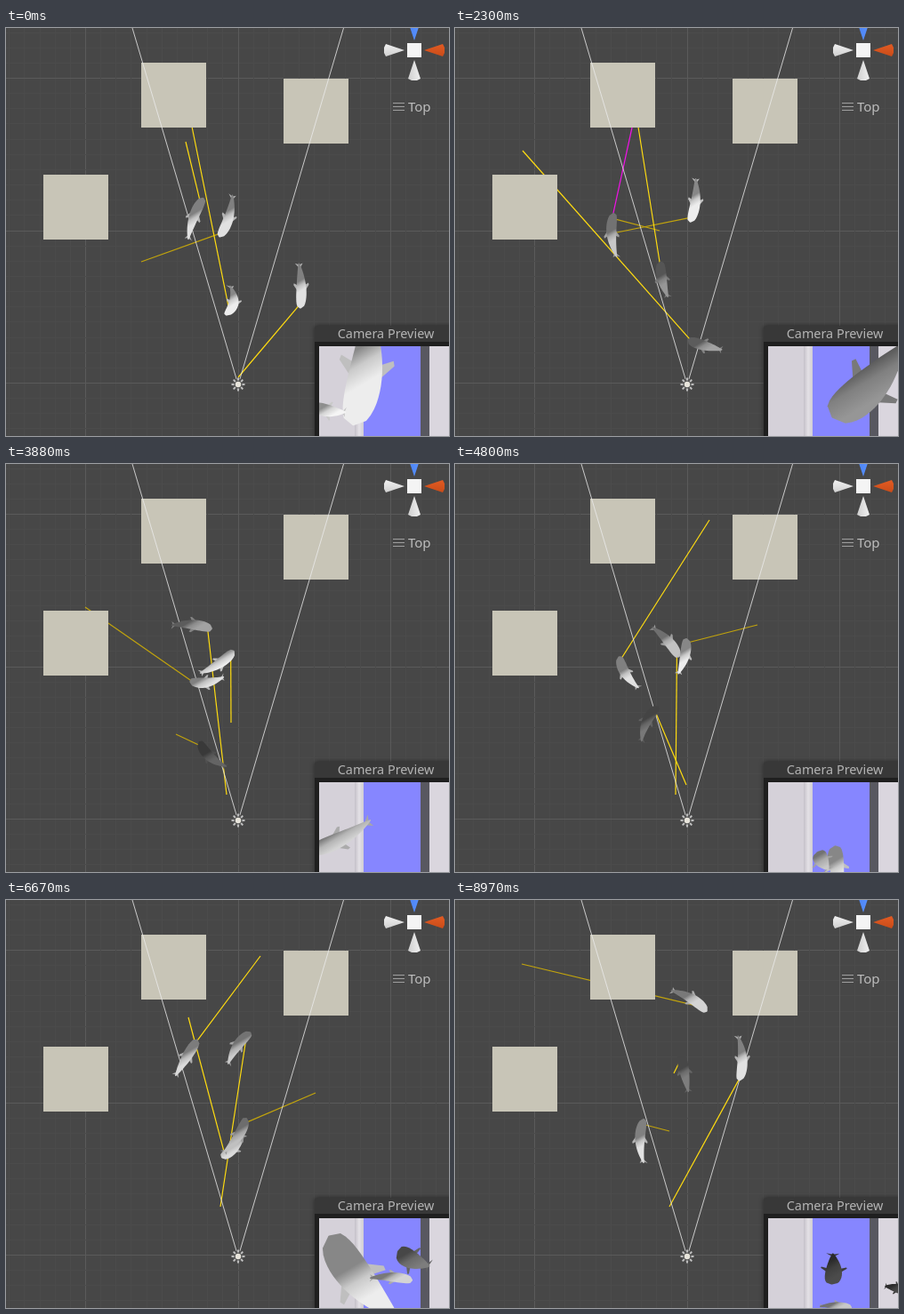
Animation, 498 px wide and 459 px high, one loop 9070 ms. Source, as an HTML page with a canvas:

```html
<!DOCTYPE html>
<html lang="en">
<head>
<meta charset="utf-8">
<title>Swimming whales</title>
<style>
html, body { margin: 0; width: 100%; height: 100%; overflow: hidden; background: #474747; }
canvas { display: block; }
</style>
</head>
<body>
<canvas id="stage" width="498" height="459"></canvas>
<script>
const ctx = document.getElementById('stage').getContext('2d');
const LOOP = 9070, STEPS = 98;
const KEYS = [0, 10, 25, 42, 61, 81, 97];
const CUBES = [[152, 39], [312, 57], [42, 165]];

// pose: x, y, heading in degrees, brightness, length
const whales = [
  {
    pose: [[212, 214, -70, .9, 50], [226, 179, -29, .8, 47], [269, 194, 97, .95, 50], [226, 244, 172, .9, 39],
           [183, 215, 297, .9, 45], [221, 148, 305, .85, 50], [264, 112, 390, .85, 47]],
    goal: [[202, 128], [260, 240], [172, 232], [89, 161], [286, 63], [286, 63], [75, 72]],
    wall: [10, 378, 129]
  }, {
    pose: [[249, 212, 107, .9, 50], [230, 248, 158, .6, 49], [178, 233, 266, .8, 50], [209, 182, 365, .65, 46],
           [250, 228, 446, .9, 45], [242, 302, 532, .85, 31], [210, 271, 630, .9, 50]],
    goal: [[152, 263], [147, 178], [230, 228], [248, 372], [248, 372], [205, 132], [241, 260]],
    wall: [25, 199, 112]
  }, {
    pose: [[253, 307, 97, .95, 34], [244, 319, 235, .35, 20], [234, 283, 258, .6, 41], [238, 224, 327, .95, 46],
           [264, 207, 244, .95, 37], [279, 145, 355, .7, 50], [321, 178, 448, .9, 51]],
    goal: [[195, 42], [195, 42], [195, 42], [253, 291], [340, 181], [241, 345], [241, 345]],
    wall: [61, 225, 75]
  }, {
    pose: [[331, 290, 88, .9, 51], [322, 330, 114, .95, 47], [281, 357, 196, .65, 40], [231, 328, 222, .4, 42],
           [229, 269, 361, .55, 46], [270, 253, 257, .95, 48], [258, 194, 259, .5, 45]],
    goal: [[261, 393], [76, 138], [76, 138], [191, 304], [260, 361], [348, 217], [246, 195]]
  }
];

// camera view: x, y, heading, brightness, length, width
const views = [
  [[402, 379, 97, .95, 138, 38], [364, 430, 190, 1, 36, 13]],
  [[389, 423, -22, 1, 54, 14], [396, 438, -58, .9, 50, 15]],
  [[467, 398, 134, .6, 118, 42]],
  [[376, 420, 153, .85, 78, 17]],
  [[428, 441, 260, .95, 50, 17], [410, 441, 240, .8, 24, 16]],
  [[379, 402, 230, .95, 126, 39], [448, 400, 205, .5, 40, 20], [446, 426, 3, .85, 48, 10]],
  [[425, 415, 92, .3, 35, 18], [428, 457, 2, .8, 36, 7], [495, 437, 15, .3, 24, 9]]
];

const rad = deg => deg * Math.PI / 180;
const mix = (a, b, u) => a + (b - a) * u;
const grey = v => { const n = Math.round(Math.max(0, Math.min(1, v)) * 245); return `rgb(${n},${n},${n})`; };

function rect(color, x, y, w, h) {
  ctx.fillStyle = color;
  ctx.fillRect(x, y, w, h);
}

function line(color, x1, y1, x2, y2, width = 1) {
  ctx.strokeStyle = color;
  ctx.lineWidth = width;
  ctx.beginPath();
  ctx.moveTo(x1, y1);
  ctx.lineTo(x2, y2);
  ctx.stroke();
}

function shape(color, points) {
  ctx.fillStyle = color;
  ctx.beginPath();
  points.forEach(([x, y]) => ctx.lineTo(x, y));
  ctx.closePath();
  ctx.fill();
}

function drawWhale(x, y, deg, tone, length, width, bend = 0) {
  const a = rad(deg), c = Math.cos(a), s = Math.sin(a);
  const spine = u => bend * length * ((u - .5) ** 2 * 4 - .5);
  const half = u => width * 1.116 * u ** .9 * (1 - u) ** .4;
  const at = (u, side) => [(u - .5) * length, spine(u) + side];
  ctx.save();
  ctx.translate(x, y);
  ctx.rotate(a);

  const lx = (-.5 * c - .85 * s) * width / 2, ly = (.5 * s - .85 * c) * width / 2;
  const skin = ctx.createLinearGradient(lx, ly, -lx, -ly);
  skin.addColorStop(0, grey(tone * .58));
  skin.addColorStop(.45, grey(tone * .87));
  skin.addColorStop(1, grey(tone * 1.02));

  for (const side of [-1, 1]) {
    shape(grey(tone * .82), [at(.62, side * width * .38), at(.48, side * width * .82),
      at(.44, side * width * .78), at(.5, side * width * .3)]);
  }
  shape(grey(tone * .8), [at(.12, 0), at(0, -width * .42), at(.035, 0), at(0, width * .42)]);

  const outline = [];
  for (let i = 0; i <= 20; i++) outline.push(at(i / 20, half(i / 20) + .5));
  for (let i = 20; i >= 0; i--) outline.push(at(i / 20, -half(i / 20) - .5));
  shape(skin, outline);
  ctx.restore();
}

// Hermite path that leaves and enters each key along the heading
function whaleAt(whale, f) {
  let i = 0;
  while (i < KEYS.length - 2 && f >= KEYS[i + 1]) i++;
  const span = KEYS[i + 1] - KEYS[i], u = (f - KEYS[i]) / span;
  const p = whale.pose[i], q = whale.pose[i + 1];
  const reach = Math.hypot(q[0] - p[0], q[1] - p[1]);
  const curve = (k, trig) => {
    const m = trig(rad(p[2])) * reach, n = trig(rad(q[2])) * reach;
    return p[k] * (2 * u ** 3 - 3 * u * u + 1) + m * (u ** 3 - 2 * u * u + u)
      + q[k] * (3 * u * u - 2 * u ** 3) + n * (u ** 3 - u * u);
  };
  const deg = mix(p[2], q[2], u), length = mix(p[4], q[4], u);
  const x = curve(0, Math.cos), y = curve(1, Math.sin);
  return {
    x, y, deg, length,
    tone: mix(p[3], q[3], u),
    bend: (q[2] - p[2]) / span * .014,
    goal: whale.goal[u < .5 ? i : i + 1],
    headX: x + Math.cos(rad(deg)) * length * .38,
    headY: y + Math.sin(rad(deg)) * length * .38
  };
}

function drawRay(w, [x, y], bright, dim) {
  const flat = Math.abs(x - w.headX) > Math.abs(y - w.headY);
  line(flat ? dim : bright, w.headX, w.headY, x, y, 1.2);
}

function drawGrid() {
  rect('#474747', 0, 0, 498, 459);
  for (let i = -6; i < 26; i++) {
    const color = i % 10 ? '#4b4b4b' : '#5a5a5a';
    const x = Math.round(89 + i * 17.15) + .5, y = Math.round(57 + i * 17.15) - .5;
    line(color, x, 0, x, 459);
    line(color, 0, y, 498, y);
  }
}

function drawCamera() {
  line('rgba(235,235,235,.8)', 142, 0, 260, 398);
  line('rgba(235,235,235,.8)', 379.5, 0, 262, 398);
  ctx.fillStyle = '#555';
  ctx.beginPath();
  ctx.arc(261, 401, 6.5, 0, 7);
  ctx.fill();
  for (let i = 0; i < 8; i++) {
    const c = Math.cos(i * Math.PI / 4), s = Math.sin(i * Math.PI / 4);
    line('#c8c8c8', 261 + c * 4.5, 401 + s * 4.5, 261 + c * 7.5, 401 + s * 7.5, 1.8);
  }
  ctx.fillStyle = '#e8e5dc';
  ctx.beginPath();
  ctx.arc(261, 401, 3.2, 0, 7);
  ctx.fill();
}

function cone(color, shade, turn) {
  ctx.save();
  ctx.translate(459, 25);
  ctx.rotate(turn);
  const fill = ctx.createLinearGradient(0, -7, 0, 7);
  fill.addColorStop(0, color);
  fill.addColorStop(1, shade);
  shape(fill, [[11, 0], [32, -7], [34, -3], [34, 3], [32, 7]]);
  ctx.restore();
}

function drawGizmo() {
  cone('#e25b23', '#c94c19', 0);
  cone('#d0d0d0', '#f0f0f0', Math.PI);
  cone('#f0f0f0', '#cfcfcf', Math.PI / 2);
  cone('#4b83f3', '#5a92ff', -Math.PI / 2);
  rect('#f4f4f4', 451, 17, 16, 16);
  for (const y of [84.5, 88.5, 92.5]) line('#a0a0a0', 435, y, 448, y);
  ctx.fillStyle = '#bdbdbd';
  ctx.font = '15px "Noto Sans", sans-serif';
  ctx.textAlign = 'left';
  ctx.fillText('Top', 452, 93.5);
}

function drawPreview(f) {
  ctx.save();
  ctx.shadowColor = 'rgba(0,0,0,.5)';
  ctx.shadowBlur = 5;
  ctx.fillStyle = '#383838';
  ctx.beginPath();
  ctx.roundRect(347, 335, 160, 140, 4);
  ctx.fill();
  ctx.restore();
  rect('#1f1f1f', 347, 353, 151, 106);
  ctx.fillStyle = '#b4b4b4';
  ctx.font = '14.4px "Noto Sans", sans-serif';
  ctx.textAlign = 'center';
  ctx.fillText('Camera Preview', 427, 349);

  ctx.save();
  ctx.beginPath();
  ctx.rect(352, 358, 146, 101);
  ctx.clip();
  rect('#d5d1d9', 352, 358, 41, 101);
  const edge = ctx.createLinearGradient(392, 0, 402, 0);
  edge.addColorStop(0, '#c4c0c8');
  edge.addColorStop(.5, '#e4e1e6');
  edge.addColorStop(1, '#d0cdd4');
  rect(edge, 392, 358, 10, 101);
  rect('#8686ff', 402, 358, 64, 101);
  rect('#585860', 466, 358, 10, 101);
  rect('#dad6de', 476, 358, 22, 101);

  let near = 0;
  KEYS.forEach((k, i) => { if (Math.abs(k - f) < Math.abs(KEYS[near] - f)) near = i; });
  for (const [x, y, deg, tone, length, width] of views[near]) {
    const drift = (f - KEYS[near]) * length * .03;
    drawWhale(x + Math.cos(rad(deg)) * drift, y + Math.sin(rad(deg)) * drift, deg, tone, length, width, .05);
  }
  ctx.restore();
}

function draw(now) {
  const f = Math.min(STEPS - 1, Math.floor((now % LOOP) / LOOP * STEPS + .2));
  const poses = whales.map(w => whaleAt(w, f));
  drawGrid();
  poses.forEach((w, i) => {
    drawRay(w, w.goal, '#ffdc10', '#c2a40c');
    const wall = whales[i].wall;
    if (wall && Math.abs(f - wall[0]) < 5) drawRay(w, wall.slice(1), '#f012e6', '#b61eae');
  });
  for (const [x, y] of CUBES) rect('#c8c5b7', x, y, 73, 73);
  drawCamera();
  for (const w of poses) drawWhale(w.x, w.y, w.deg, w.tone, w.length, 10.5, w.bend);
  drawGizmo();
  drawPreview(f);
}

const start = performance.now();
function tick() {
  draw(performance.now() - start);
  requestAnimationFrame(tick);
}
tick();
</script>
</body>
</html>
```
